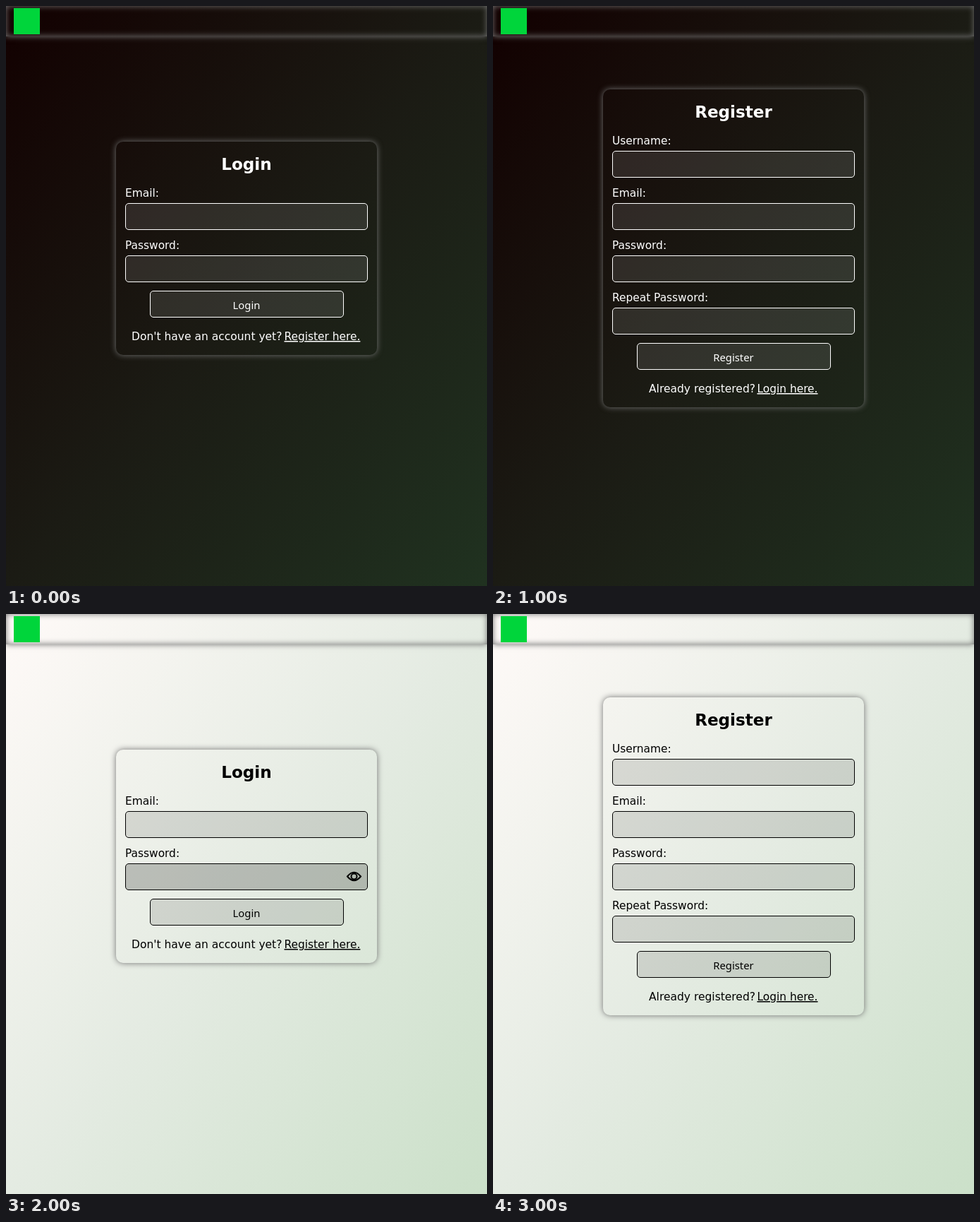
Animation of 682x821 px, one loop 4 s. Source, as an HTML page:

```html
<!DOCTYPE html>
<html lang="en">
<head>
<meta charset="utf-8">
<title>Login and register forms</title>
<style>
  html, body { margin: 0; width: 100%; height: 100%; overflow: hidden; }
  body {
    --ink: #fff; --glow: #737373; --fill: rgba(255, 255, 255, .1);
    --bg: linear-gradient(to bottom right, #120000, #1b1b14 50%, #203220);
    position: relative;
    background: var(--bg);
  }
  body.light {
    --ink: #000; --glow: #707070; --fill: rgba(0, 0, 0, .11);
    --bg: linear-gradient(to bottom right, #fffaf8, #e4ebe2 50%, #cbe0c9);
  }
  header, main, svg { position: absolute; left: 0; top: 0; }
  header {
    width: 100%; height: 43px;
    box-shadow: 0 0 8px var(--glow), inset 0 0 8px var(--glow);
  }
  main { left: 156px; width: 370px; border-radius: 10px; box-shadow: 0 0 8px var(--glow); }
  text { font: 15.4px "DejaVu Sans", sans-serif; fill: var(--ink); }
  .title { font-size: 23.1px; font-weight: bold; }
  .hint { font-size: 15.5px; }
  .link { text-decoration: underline 1px; text-underline-offset: 2px; }
  .caption { font: 14.8px "Noto Sans", sans-serif; }
  .title, .caption { text-anchor: middle; }
  .box { fill: var(--fill); stroke: var(--ink); }
  .hover { fill: rgba(0, 0, 0, .21); }
  .eye { fill: none; stroke: var(--ink); stroke-width: 2; }
</style>
</head>
<body>
<header></header>
<main></main>
<svg width="682" height="821"></svg>
<script>
const card = document.querySelector("main");
const svg = document.querySelector("svg");
const STEP = 74;

const forms = [
  { title: "Login", top: 192, fields: ["Email:", "Password:"],
    hint: ["Don't have an account yet?", 178], link: ["Register here.", 394.5] },
  { title: "Register", top: 118,
    fields: ["Username:", "Email:", "Password:", "Repeat Password:"],
    hint: ["Already registered?", 221], link: ["Login here.", 374.5] }
];

const text = (s, x, y, cls = "") => `<text x="${x}" y="${y}" class="${cls}">${s}</text>`;
const box = (x, y, w, h, cls = "") =>
  `<rect x="${x + .5}" y="${y + .5}" width="${w - 1}" height="${h - 1}" rx="4.5" class="box ${cls}"/>`;
const eye = `<g class="eye"><path d="M484 371.5Q493.5 360 503 371.5Q493.5 383 484 371.5Z"/>
  <circle cx="493.5" cy="371.5" r="4"/></g>`;

function draw(form, light) {
  const fieldsHeight = form.fields.length * STEP;
  document.body.className = light ? "light" : "";
  card.style.top = form.top + "px";
  card.style.height = fieldsHeight + 154 + "px";

  const hovered = light && form === forms[0] ? 1 : -1;
  const end = form.top + fieldsHeight;
  svg.innerHTML =
    '<rect x="11" y="3" width="37" height="37" fill="#00d53b"/>' +
    text(form.title, 341, form.top + 40, "title") +
    form.fields.map((label, i) => {
      const y = form.top + i * STEP;
      return text(label, 169, y + 78) +
        box(169, y + 87, 344, 38, i === hovered ? "hover" : "") +
        (i === hovered ? eye : "");
    }).join("") +
    box(204, end + 63, 275, 38) +
    text(form.title, 341, end + 89, "caption") +
    text(...form.hint, end + 133, "hint") +
    text(...form.link, end + 133, "link");
}

let shown = -1;
const start = performance.now();
function tick() {
  const state = Math.floor((performance.now() - start) / 1000) % 4;
  if (state !== shown) draw(forms[state % 2], state > 1);
  shown = state;
  requestAnimationFrame(tick);
}
tick();
</script>
</body>
</html>
```
